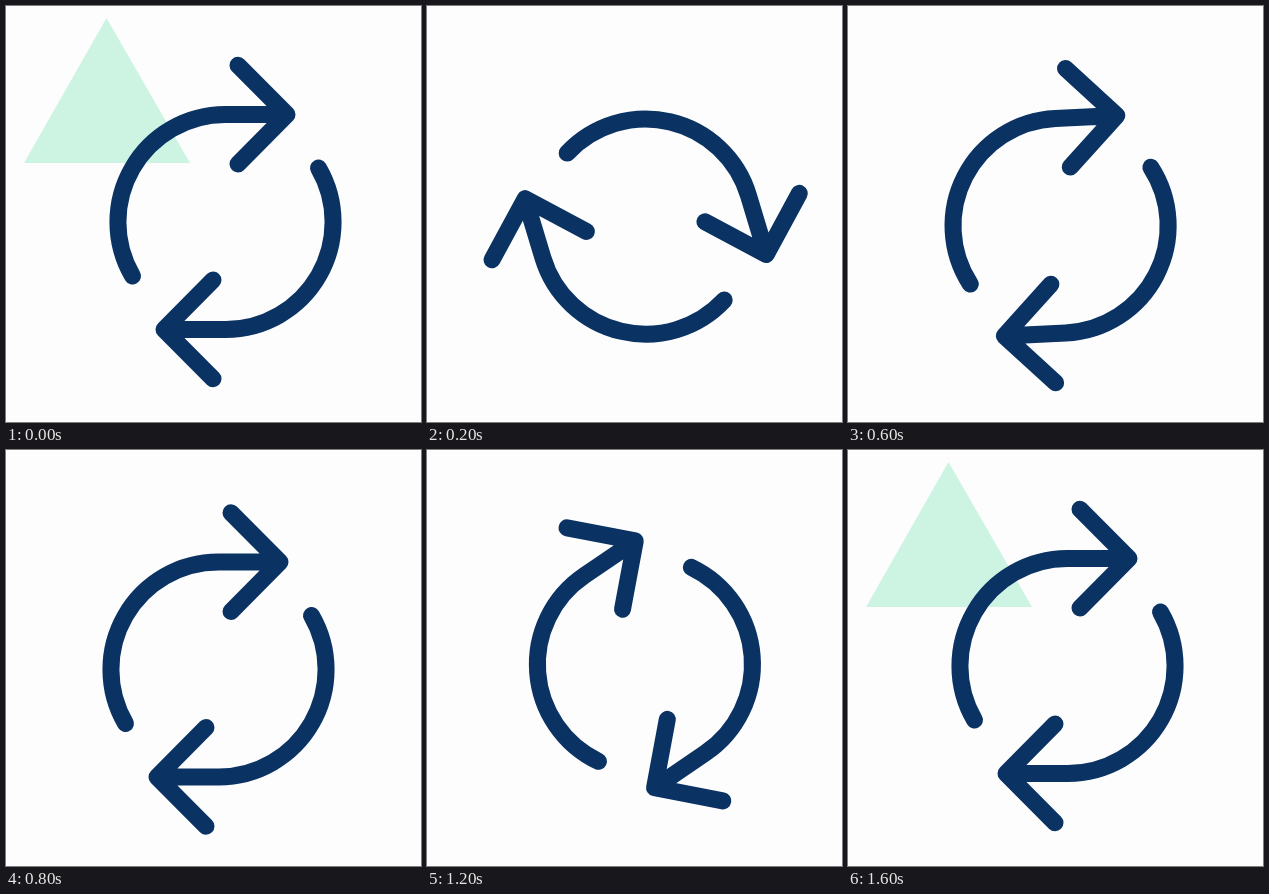
Recreate the animation shown at these times as an HTML page. Size 415 by 416 pixels, loop 1700 ms.

```html
<!DOCTYPE html>
<html lang="en">
<head>
<meta charset="utf-8">
<title>Refresh arrows</title>
<style>
  html, body { margin: 0; height: 100%; overflow: hidden; background: #fdfdfd; }
  svg { display: block; width: 100vw; height: 100vh; }
  #arrows { fill: none; stroke: #0a3263; stroke-width: 17; stroke-linecap: round; stroke-linejoin: round; }
</style>
</head>
<body>
<svg viewBox="0 0 415 416">
  <defs>
    <path id="arrow" d="M-93 54A107.4 107.4 0 0 1 0 -107.4H61.5M12.5 -156.7L61.5 -107.4L12.5 -58.1"/>
  </defs>
  <path id="triangle" fill="#cdf4e3" d="M100.5 12L184 157H18Z"/>
  <g id="arrows">
    <use href="#arrow"/>
    <use href="#arrow" transform="rotate(180)"/>
  </g>
</svg>
<script>
  const LOOP = 1700, STEP = 100;
  const TURN = 678, FIRST = 31, SECOND = 856;
  const arrows = document.getElementById('arrows');
  const triangle = document.getElementById('triangle');

  // The CSS "ease" curve, cubic-bezier(.25, .1, .25, 1), solved by bisection.
  const bezier = (s, p1, p2) => 3 * (1 - s) ** 2 * s * p1 + 3 * (1 - s) * s * s * p2 + s ** 3;
  function ease(x) {
    if (x <= 0) return 0;
    if (x >= 1) return 1;
    let lo = 0, hi = 1;
    for (let i = 0; i < 30; i++) {
      const mid = (lo + hi) / 2;
      if (bezier(mid, 0.25, 0.25) < x) lo = mid;
      else hi = mid;
    }
    return bezier(lo, 0.1, 1);
  }

  // Two eased half turns around a pivot slightly off the icon's centre.
  function draw(t) {
    const angle = 180 * (ease((t - FIRST) / TURN) + ease((t - SECOND) / TURN));
    arrows.setAttribute('transform',
      `translate(216 217.75) rotate(${angle.toFixed(3)}) translate(3.5 -1.75)`);
    triangle.style.display = t < STEP || t >= LOOP - STEP ? '' : 'none';
  }

  const start = performance.now();
  function tick() {
    const t = (performance.now() - start) % LOOP;
    draw(Math.floor(t / STEP) * STEP);
    requestAnimationFrame(tick);
  }
  tick();
</script>
</body>
</html>
```
